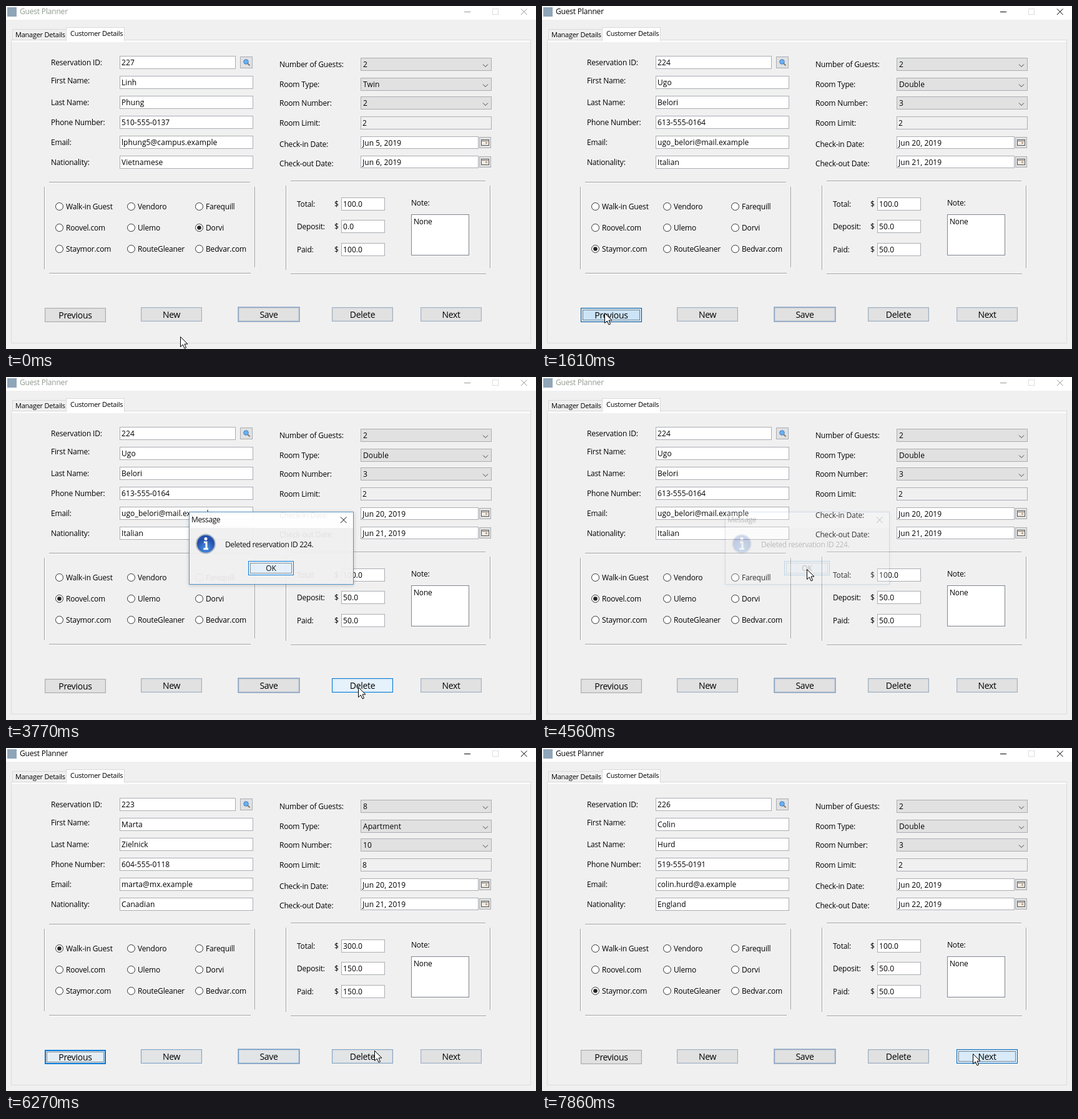
These frames come from a looping animation (849x550 px, 8 s). An HTML page:

```html
<!DOCTYPE html>
<html lang="en">
<head>
<meta charset="utf-8">
<title>Guest Planner</title>
<style>
  html, body { margin: 0; width: 100%; height: 100%; overflow: hidden; background: #f0f0f0; }
  svg { display: block; }
  text { font: 12px "Open Sans", "Noto Sans", sans-serif; letter-spacing: -.18px; white-space: pre; }
  .value { letter-spacing: .08px; }
  .tab { font-size: 11px; letter-spacing: -.25px; }
  .tight { letter-spacing: -.4px; }
  .big { font-size: 14px; letter-spacing: -.3px; text-anchor: middle; }
  #dialog { filter: drop-shadow(0 1px 3px rgba(0, 0, 0, .2)); }
</style>
</head>
<body>
<svg id="stage" width="849" height="550" viewBox="0 0 849 550"></svg>
<script>
const LOOP = 8000;

function booking(who, room, channel, total, deposit, checkIn = 'Jun 20, 2019', checkOut = 'Jun 21, 2019') {
  const [guests] = room, money = [total, deposit, total - deposit].map(v => v.toFixed(1));
  return { values: [...who, ...room, guests, checkIn, checkOut, ...money], channel };
}
const b227 = booking(['227', 'Linh', 'Phung', '510-555-0137', 'lphung5@campus.example', 'Vietnamese'],
  ['2', 'Twin', '2'], 7, 100, 0, 'Jun 5, 2019', 'Jun 6, 2019');
const b226 = booking(['226', 'Colin', 'Hurd', '519-555-0191', 'colin.hurd@a.example', 'England'],
  ['2', 'Double', '3'], 2, 100, 50, 'Jun 20, 2019', 'Jun 22, 2019');
const b225 = booking(['225', 'Edwin', 'Falk', '416-555-0125', 'edwin.falk@b.example', 'German'],
  ['2', 'Twin', '2'], 2, 100, 50);
const b224 = booking(['224', 'Ugo', 'Belori', '613-555-0164', 'ugo_belori@mail.example', 'Italian'],
  ['2', 'Double', '3'], 1, 100, 50);
const b223 = booking(['223', 'Marta', 'Zielnick', '604-555-0118', 'marta@mx.example', 'Canadian'],
  ['8', 'Apartment', '10'], 0, 300, 150);

// What is clicked when, and the booking each click brings up
const clicks = [
  { time: 570, on: 'Previous', show: b226 }, { time: 1050, on: 'Previous', show: b225 },
  { time: 1530, on: 'Previous', show: b224 }, { time: 3430, on: 'Delete' }, { time: 4250, on: 'OK' },
  { time: 5890, on: 'Previous', show: b223 }, { time: 6740, on: 'Next', show: b225 },
  { time: 7620, on: 'Next', show: b226 }
];
const clickTime = on => clicks.find(c => c.on === on).time;
const opened = clickTime('Delete') + 210, closed = clickTime('OK') + 170;

// Cursor moves: from, to, x, y
const home = [279, 530];
const moves = [[80, 410, 100, 492], [2200, 2640, 313, 499], [2790, 3090, 564, 497], [3850, 4090, 424, 308],
  [5100, 5180, 138, 427], [5180, 5330, 104, 489], [6060, 6270, 590, 485], [6270, 6590, 690, 490]];

const channels = ['Walk-in Guest', 'Roovel.com', 'Staymor.com', 'Vendoro', 'Ulemo', 'RouteGleaner',
  'Farequill', 'Dorvi', 'Bedvar.com'].map((name, i) =>
  ({ name, x: [85.5, 200.5, 309.5][i / 3 | 0], y: 321.5 + 34 * (i % 3) }));

const push = (label, x, y, edge, w = 98) => ({ label, x, y, w, h: 23, edge });
const pushes = [
  push('Previous', 62, 484, '#adadad'), push('New', 216, 483, '#a0b2c8'), push('Save', 372, 483, '#8ea6c2'),
  push('Delete', 522, 483, '#9cadc0'), push('Next', 664, 483, '#a0b2c8'), push('OK', 388, 295, '#0078d7', 73)
];

// Drawing helpers
const attrs = o => Object.entries(o).map(([k, v]) => ` ${k}="${v}"`).join('');
const rect = (x, y, width, height, fill, more = {}) => `<rect${attrs({ x, y, width, height, fill, ...more })}/>`;
const box = (x, y, w, h, fill = '#fff', stroke = '#abadb3', more = {}) =>
  rect(x + .5, y + .5, w - 1, h - 1, fill, { stroke, ...more });
const line = (d, stroke, more = {}) => `<path${attrs({ d, stroke, fill: 'none', ...more })}/>`;
const circle = (cx, cy, r, fill, more = {}) => `<circle${attrs({ cx, cy, r, fill, ...more })}/>`;
const text = (x, y, s, more = {}) => `<text${attrs({ x, y, ...more })}>${s}</text>`;

let fieldCount = 0;
const value = (x, y) => text(x, y, '', { id: 'field' + fieldCount++, class: 'value' });

function etched(l, t, r, b) {
  const d = o => `M${l + 8} ${t + o}H${r - 7}M${l + 8} ${b + o}H${r - 6}M${l + o} ${t + 8}V${b - 6}M${r + o} ${t + 8}V${b - 9}`;
  return line(d(1.5), '#fff') + line(d(.5), '#a0a0a0');
}

function pushMarkup({ label, x, y, w, h }) {
  return box(x, y, w, h, '#e1e1e1', '#adadad', { id: label }) +
    box(x + 1, y + 1, w - 2, h - 2, 'none', '#0078d7', { id: label + 'Ring' }) +
    box(x + 3, y + 3, w - 6, h - 6, 'none', '#222', { id: label + 'Dots', 'stroke-dasharray': '1 1' }) +
    (label === 'OK' ? text(x + w / 2, y + 16, label, { 'text-anchor': 'middle' })
      : text(x + w / 2, y + 17, label, { class: 'big' }));
}

function windowMarkup() {
  return rect(0, 0, 849, 550, '#f0f0f0') + rect(0, 0, 849, 22, '#fff') + rect(2, 2, 15, 15, '#8fa5b8') +
    text(22, 13, 'Guest Planner', { id: 'title' }) +
    line('M734 9.5H744M825 4.5L834.5 14M834.5 4.5L825 14', '#000', { id: 'controls' }) +
    box(779, 4, 10, 10, 'none', '#ddd') +
    box(8, 54, 833, 487, '#f0f0f0', '#dcdcdc') + rect(9, 55, 831, 3, '#fafafa') +
    box(10, 37, 87, 18, '#f0f0f0', '#d9d9d9') + box(96, 34, 94, 22, '#fff', '#d9d9d9') + rect(97, 54, 92, 4, '#fff') +
    text(15, 50, 'Manager Details', { class: 'tab' }) + text(103, 48, 'Customer Details', { class: 'tab' });
}

function guestMarkup() {
  let s = '';
  ['Reservation ID:', 'First Name:', 'Last Name:', 'Phone Number:', 'Email:', 'Nationality:'].forEach((label, i) => {
    const y = 80 + 32 * i;
    s += text(72, y + (i === 1 ? 12 : 15), label) + box(182, y, i ? 214 : 186, 21) + value(185, y + 15);
  });
  return s + box(375, 81, 20, 19, '#e1e1e1') + line('M387 92L390.5 95.5', '#8a7a68', { 'stroke-width': 2 }) +
    circle(384.5, 89.5, 3.8, '#6bb0ee', { stroke: '#3a80c8' });
}

function roomMarkup() {
  let s = '';
  const rows = { 'Number of Guests:': 83, 'Room Type:': 115, 'Room Number:': 145, 'Room Limit:': 177,
    'Check-in Date:': 209, 'Check-out Date:': 240 };
  Object.entries(rows).forEach(([label, y], i) => {
    if (i < 3) s += box(568, y, 210, 21, '#e1e1e1') + line(`M764 ${y + 10.5}l4 4l4 -4`, '#444');
    else if (i === 3) s += box(568, y, 210, 21, '#f0f0f0');
    else s += box(568, y, 189, 20) + box(758, y + 1, 19, 18, '#e1e1e1') +
      box(761, y + 5, 13, 10, '#f0ece6', '#555') + line(`M761 ${y + 7.5}h13`, '#777') + rect(768, y + 9, 3, 3, '#c9a888');
    s += text(438, y + (i < 4 ? 15 : 17), label) + value(i < 3 ? 572 : 571, y + 15);
  });
  return s;
}

function lowerMarkup() {
  let s = etched(61, 282, 398, 428) + etched(448, 280, 775, 429);
  channels.forEach(({ name, x, y }, i) => {
    s += circle(x, y, 6, '#fff', { id: 'radio' + i, stroke: '#333' }) +
      circle(x, y, 3.3, '#222', { id: 'dot' + i }) + text(x + 10.5, y + 4.5, name);
  });
  Object.entries({ 'Total:': 307, 'Deposit:': 343, 'Paid:': 380 }).forEach(([label, y]) => {
    s += text(466, y + 15, label) + text(526, y + 15, '$') + box(537, y, 70, 21) + value(540, y + 15);
  });
  return s + text(649, 320, 'Note:') + box(649, 334, 93, 66, '#fff', '#828790') + text(653, 350, 'None') +
    box(371, 482, 100, 25, 'none', '#a9bbd0') + pushes.slice(0, 5).map(pushMarkup).join('');
}

function dialogMarkup() {
  return '<g id="dialog">' + box(293, 216, 264, 117, '#f0f0f0', '#4a8fc7') + rect(294, 217, 262, 25, '#fff') +
    text(297, 233, 'Message', { class: 'tight' }) + line('M536 224.5L545.5 234M545.5 224.5L536 234', '#000') +
    '<radialGradient id="blue" cy=".75"><stop stop-color="#3f8fe8"/><stop offset="1" stop-color="#1746a8"/></radialGradient>' +
    circle(320, 267.5, 15, 'url(#blue)', { stroke: '#aab4c0', 'stroke-width': 2 }) + circle(320, 259.5, 2.5, '#fff') +
    line('M317 265H321V275M316.5 275.5H324', '#fff', { 'stroke-width': 3 }) +
    text(351, 273, 'Deleted reservation ID 224.', { class: 'tight' }) + pushMarkup(pushes[5]) + '</g>';
}

const arrow = '<path id="cursor" d="M.5 .5V16.5L4.3 13L7 19L9.5 18L7 12H12Z" fill="#fff" stroke="#000"/>';
document.getElementById('stage').innerHTML =
  windowMarkup() + guestMarkup() + roomMarkup() + lowerMarkup() + dialogMarkup() + arrow;

const nodes = {};
document.querySelectorAll('[id]').forEach(n => nodes[n.id] = n);
const set = (id, name, v) => nodes[id].setAttribute(name, v);

// Motion helpers
const ramp = (t, from, to) => Math.min(1, Math.max(0, (t - from) / (to - from)));
const mix = (a, b, f) => a + (b - a) * f;
function blend(a, b, f) {
  const part = (c, i) => parseInt(c.slice(i, i + 2), 16);
  return `rgb(${[1, 3, 5].map(i => Math.round(mix(part(a, i), part(b, i), f)))})`;
}
const heatColor = (colors, v) => v < 1 ? blend(colors[0], colors[1], v) : blend(colors[1], colors[2], v - 1);

const cursorAt = t => moves.reduce(([x, y], [from, to, nx, ny]) => {
  const f = ramp(t, from, to);
  return [mix(x, nx, f), mix(y, ny, f)];
}, home);

// Share of the last 200 ms that the cursor spent over an area: hovering fades in and out
function hover(t, x, y, w, h) {
  let hits = 0;
  for (let k = 0; k < 40; k++) {
    const [cx, cy] = cursorAt(t - 5 * k);
    hits += cx >= x && cx <= x + w && cy >= y && cy <= y + h;
  }
  return hits / 40;
}

function paintPush({ label, x, y, w, h, edge }, t, focused) {
  const pulse = focused ? .45 - .45 * Math.cos(2 * Math.PI * (t - 3090) / 1350) : 0;
  const over = label === 'OK' ? 1 : Math.max(hover(t, x, y, w, h), pulse);
  const pressed = Math.max(...clicks.map(c => c.on === label
    ? ramp(t, c.time, c.time + 40) * (1 - ramp(t, c.time + 140, c.time + 340)) : 0));
  const heat = over + pressed * (2 - over);
  const fill = heatColor(['#e1e1e1', '#e5f1fb', '#cce4f7'], heat);
  set(label, 'fill', fill);
  set(label, 'stroke', heatColor([focused ? '#0078d7' : edge, '#0078d7', '#005499'], heat));
  set(label + 'Ring', 'opacity', focused ? heat < 1 ? 1 : 0 : .2);
  set(label + 'Ring', 'stroke', focused ? '#0078d7' : edge);
  set(label + 'Dots', 'opacity', focused ? 1 : 0);
}

function render(t) {
  const dialog = ramp(t, opened, opened + 140) * (1 - ramp(t, closed, closed + 180));
  const active = ramp(t, 560, 640) * (1 - ramp(t, opened - 40, opened + 40) * (1 - ramp(t, closed + 140, closed + 260)));
  set('title', 'fill', blend('#8f9a8f', '#000000', active));
  set('controls', 'stroke', blend('#999999', '#000000', active));
  set('dialog', 'opacity', dialog);

  const delay = 50;
  const past = clicks.filter(c => c.show && t >= c.time + delay);
  const last = past[past.length - 1];
  const now = last ? last.show : b227;
  const before = past.length > 1 ? past[past.length - 2].show : b227;
  now.values.forEach((v, i) => nodes['field' + i].textContent = v);
  const fade = last ? ramp(t, last.time + delay + 60, last.time + delay + 260) : 1;
  channels.forEach(({ x, y }, i) => {
    set('dot' + i, 'opacity', (now.channel === i) * fade + (before.channel === i) * (1 - fade));
    set('radio' + i, 'stroke', blend('#333333', '#0078d7', Math.min(1, 8 * hover(t, x - 7, y - 10, 90, 20))));
  });

  const latest = clicks.filter(c => c.on !== 'OK' && t >= c.time + 30).pop();
  for (const p of pushes) paintPush(p, t, p.label === 'OK' || active > .5 && !!latest && latest.on === p.label);
  const [x, y] = cursorAt(t).map(Math.round);
  set('cursor', 'transform', `translate(${x} ${y})`);
}

function tick() {
  render(performance.now() % LOOP);
  requestAnimationFrame(tick);
}
tick();
</script>
</body>
</html>
```
